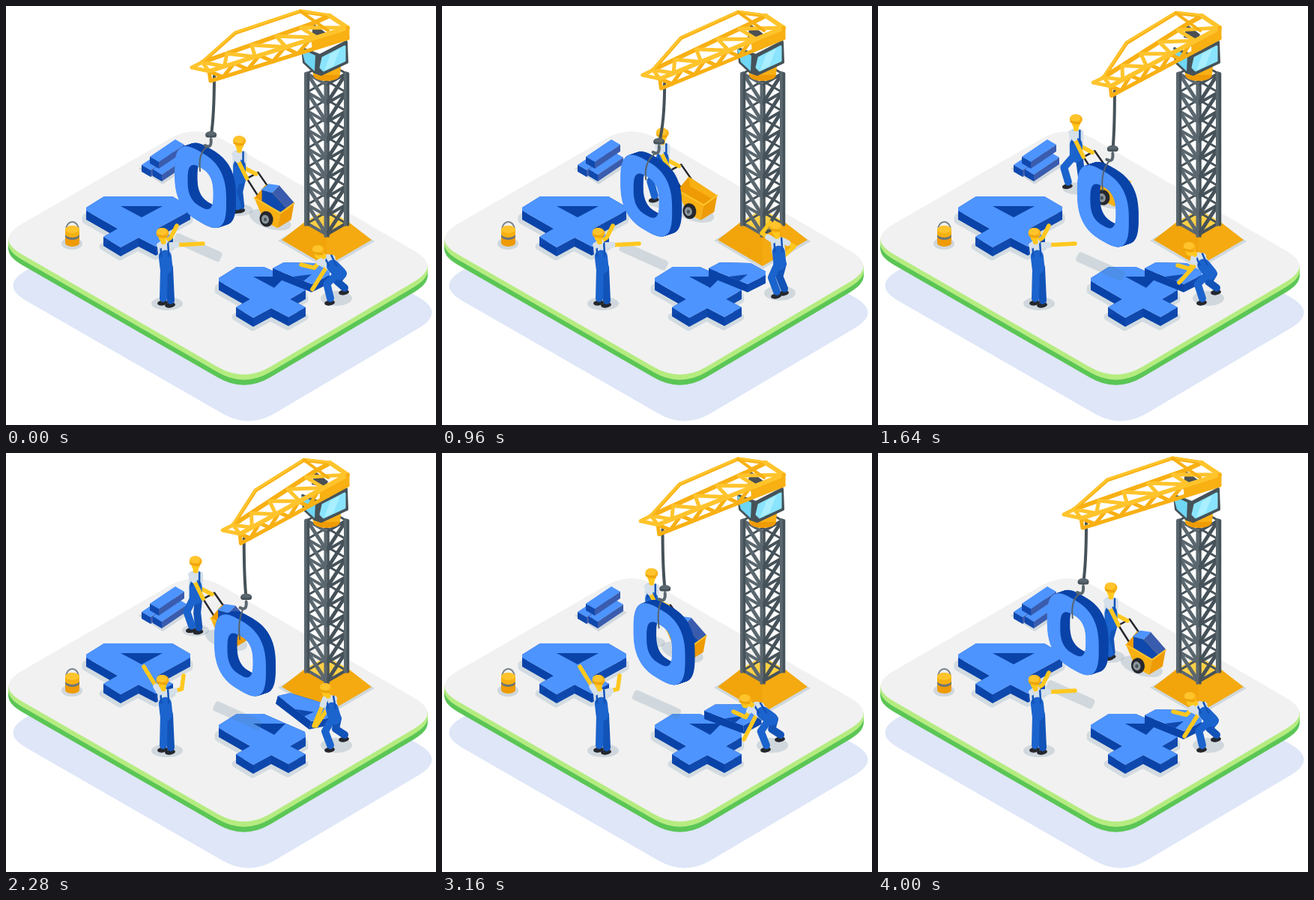
An HTML page with a canvas that plays this animation: 574x559 px, repeating every 4.04 s.

```html
<!DOCTYPE html>
<html lang="en">
<head>
<meta charset="utf-8">
<title>404 construction site</title>
<style>
html, body { margin: 0; width: 100%; height: 100%; overflow: hidden; background: #fff; }
canvas { display: block; width: 574px; height: 559px; }
</style>
</head>
<body>
<canvas id="stage"></canvas>
<script>
const W = 574, H = 559, LOOP = 4040;
const canvas = document.getElementById('stage');
const g = canvas.getContext('2d');
const dpr = window.devicePixelRatio || 1;
canvas.width = W * dpr;
canvas.height = H * dpr;

const BLUE = '#4d94ff', NAVY = '#0a43a8', ROYAL = '#1049ae', SLATE = '#3a5cae';
const SHADE = 'rgba(75,115,140,.2)', STEEL = '#5b676f', IRON = '#465259';
const GOLD = '#ffc42c', AMBER = '#f8b013', ORANGE = '#ee9b05';
const SKIN = '#ffc81f', SHIRT = '#d5e0ea', DENIM = '#1b63cd', DENIM2 = '#1253b8', SHOE = '#25272e';

// ---------- drawing helpers ----------
function trace(p) {
  g.beginPath();
  for (let i = 0; i < p.length; i += 2) g.lineTo(p[i], p[i + 1]);
}
function poly(p, fill) {
  trace(p);
  g.closePath();
  g.fillStyle = fill;
  g.fill();
}
function line(p, color, w) {
  trace(p);
  g.strokeStyle = color;
  g.lineWidth = w;
  g.lineCap = g.lineJoin = 'round';
  g.stroke();
}
function softPoly(p, fill, w) {
  poly(p, fill);
  line([...p, p[0], p[1]], fill, w);
}
function oval(x, y, rx, ry, fill, rot = 0) {
  g.beginPath();
  g.ellipse(x, y, rx, ry, rot, 0, 7);
  g.fillStyle = fill;
  g.fill();
}
function at(x, y, draw, rot = 0) {
  g.save();
  g.translate(x, y);
  g.rotate(rot);
  draw();
  g.restore();
}
// Flat shape with walls going straight down
function prism(p, h, top = BLUE) {
  for (let i = 0; i < p.length; i += 2) {
    const j = (i + 2) % p.length;
    const [x, y, u, v] = [p[i], p[i + 1], p[j], p[j + 1]];
    poly([x, y, u, v, u, v + h, x, y + h], (u - x) * (v - y) > 0 ? NAVY : ROYAL);
  }
  poly(p, top);
}

// ---------- motion helpers ----------
const mix = (a, b, k) => a + (b - a) * k;
const mixAll = (a, b, k) => a.map((v, i) => mix(v, b[i], k));

function keyed(steps, t) {
  let i = 0;
  while (i < steps.length - 2 && t > steps[i + 1][0]) i++;
  const [t0, a] = steps[i], [t1, b] = steps[i + 1];
  const k = Math.min(1, Math.max(0, (t - t0) / (t1 - t0)));
  return mixAll(a, b, k * k * (3 - 2 * k));
}
const swing = (t, mid, amp, lag) => mid - amp * Math.cos((t - lag) / LOOP * 2 * Math.PI);

// ---------- ground ----------
function slab(dx, dy, fill) {
  const c = [[253, 157], [580, 347], [318, 502], [-14, 311]];
  g.beginPath();
  c.forEach((q, i) => {
    const toward = o => mixAll(q, o, 35 / Math.abs(o[0] - q[0]));
    const [ax, ay] = toward(c[(i + 3) % 4]), [bx, by] = toward(c[(i + 1) % 4]);
    g.lineTo(ax + dx, ay + dy);
    g.quadraticCurveTo(q[0] + dx, q[1] + dy, bx + dx, by + dy);
  });
  g.closePath();
  g.fillStyle = fill;
  g.fill();
}
function ground() {
  slab(6, 62, '#dee6f8');
  for (let d = 14; d > 0; d--) slab(0, d, d > 7 ? '#5bc656' : '#b5ec80');
  slab(0, 0, '#f1f1f1');
}

function bucket() {
  oval(88, 317, 14, 8, SHADE);
  g.beginPath();
  g.ellipse(88.5, 299, 8.5, 11, 0, Math.PI, 0);
  g.strokeStyle = '#7b868c';
  g.lineWidth = 2;
  g.stroke();
  for (let y = 316; y >= 298; y--) {
    const band = y > 307 ? ORANGE : y > 304 ? '#69747a' : AMBER;
    oval(88.5, y, 9.5, 5, y === 298 ? GOLD : band);
  }
}

function brick(x, y) {
  at(x, y, () => {
    poly([0, 0, 34, -23, 46, -16, 12, 7], BLUE);
    poly([0, 0, 12, 7, 12, 16, 0, 9], ROYAL);
    poly([12, 7, 46, -16, 46, -7, 12, 16], SLATE);
  });
}
function brickPile() {
  poly([177, 217, 209, 238, 247, 213, 215, 196], SHADE);
  brick(181, 212);
  brick(196, 218);
  brick(192, 201);
}

// ---------- digits ----------
const FOUR = [0, 15, 24, 0, 115, 0, 139, 14, 139, 19, 95, 43, 116, 54, 93, 67,
  70, 55, 46, 68, 23, 54, 42, 43, 0, 19];
const BROKEN = [...FOUR.slice(0, 4), 60, 0, 115, 24, 116, 31, ...FOUR.slice(10)];

function four(x, y, shape, holeRight) {
  at(x, y, () => {
    at(-1, 13, () => softPoly(shape, '#d2dbe0', 9));
    prism(shape, 12);
    poly([46, 13, holeRight, 13, 74, 28], NAVY);
  });
}
function piece(t) {
  const rest = [356, 350, 0];
  const [x, y, r] = keyed([[0, rest], [1700, rest], [2280, [363, 324, .27]],
    [3160, [350, 344, -.03]], [3950, rest]], t);
  at(x, y, () => {
    prism([0, 0, 15, -8, 56, -7, 76, 4, 76, 9, 52, 21], 11);
    poly([27, 11, 52, 8, 41, 17], ROYAL);
  }, r);
}

// Rounded box on the upright plane, which drops by .577 per unit to the right
function roundel(path, rx, ry) {
  const soft = v => Math.sign(v) * Math.abs(v) ** (2 / 2.8);
  for (let i = 0; i < 90; i++) {
    const a = i / 45 * Math.PI, x = rx * soft(Math.cos(a));
    path.lineTo(34.5 + x, 58.5 + .577 * x + ry * soft(Math.sin(a)));
  }
  path.closePath();
}
const ring = new Path2D(), hole = new Path2D();
roundel(ring, 34.5, 47);
roundel(hole, 17, 26);
ring.addPath(hole);

const zeroPlace = t => [swing(t, 250.5, 27.5, 250), swing(t, 197.5, 14.5, 80)];

function zeroShadow(t) {
  const [x, y] = zeroPlace(t);
  at(x + 31, y + 139, () => {
    g.beginPath();
    g.roundRect(-34, -7, 68, 14, 4);
    g.fillStyle = SHADE;
    g.fill();
  }, .42);
}
function zero(t) {
  const [x, y] = zeroPlace(t);
  for (let i = 26; i >= 0; i--) {
    at(x + i / 2, y - i * .17, () => {
      g.fillStyle = i ? NAVY : BLUE;
      g.fill(ring, 'evenodd');
    });
  }
}
function cord(x, y, cx, cy, u, v, color, w) {
  g.beginPath();
  g.moveTo(x, y);
  g.quadraticCurveTo(cx, cy, u, v);
  g.strokeStyle = color;
  g.lineWidth = w;
  g.lineCap = 'round';
  g.stroke();
}
function ropeAndHook(t) {
  const tx = swing(t, 298.7, 20.7, 0), ty = swing(t, 104, 11, 0);
  const hx = swing(t, 297, 24, 150), hy = swing(t, 184.5, 10.5, 40);
  const [zx, zy] = zeroPlace(t);
  cord(tx, ty, tx, mix(ty, hy, .65), hx, hy, IRON, 4);
  cord(hx - 4, hy + 13, zx + 31, zy + 12, zx + 34, zy + 37, '#56636e', 2);
  cord(hx, hy + 4, hx + 1, hy + 17, hx - 8, hy + 12, STEEL, 4);
  line([hx - 4, hy - 2, hx + 4, hy - 2], IRON, 7);
  oval(hx, hy - 4, 6.5, 3, STEEL);
}

// ---------- crane ----------
function tower() {
  poly([363, 313, 398, 292, 458, 292, 492, 314, 428, 351], SHADE);
  poly([368, 312, 399, 288, 428, 305, 428, 347], '#f1a50b');
  poly([488, 312, 457, 288, 428, 305, 428, 347], '#f4aa10');
  poly([399, 288, 428, 271, 457, 288, 428, 305], '#ffd045');
  const step = 25, panels = 8;
  for (let k = 0; k <= panels; k++) {
    const y = 90 + k * step;
    line([402, y, 428, y - 15, 454, y], IRON, 3);
  }
  for (let k = 0; k <= panels; k++) {
    const y = 90 + k * step;
    for (const [x, color] of [[402, STEEL], [454, IRON]]) {
      line([x, y, 428, y + 15], color, 4);
      if (k < panels) line([x, y, 428, y + 15 + step], color, 5);
    }
  }
  for (const [x, y] of [[400, 90], [426.5, 105], [453, 90]]) {
    line([x, y, x, y + 202], STEEL, 4);
    line([x + 3.5, y, x + 3.5, y + 202], IRON, 3.5);
  }
}

function cab() {
  oval(428, 92, 18, 8, ORANGE);
  poly([408, 80, 447, 80, 446, 92, 410, 92], AMBER);
  softPoly([396, 57, 419, 66, 454, 48, 455, 75, 421, 91, 412, 88, 398, 75], IRON, 4);
  poly([394, 57, 413, 66, 412, 87, 399, 75], '#6fd6f4');
  softPoly([423, 69, 452, 54, 452, 73, 424, 86, 420, 82], '#8ae4fd', 3);
  poly([433, 64, 446, 57, 437, 80, 425, 86], '#a9efff');
}

function zigzag(a, b, c, d, n, color, w) {
  const pts = [];
  for (let i = 0; i <= n; i++) pts.push(...(i % 2 ? mixAll(c, d, i / n) : mixAll(a, b, i / n)));
  line(pts, color, w);
}
function boom(t) {
  const k = swing(t, .5, .5, 0);
  // The further from the mast, the more a joint turns
  const joint = (x, y) => {
    const reach = Math.min(1, ((456 - x) / 185) ** 2) * k;
    return [x + 43 * reach, y + 22 * reach];
  };
  const tip = joint(248, 82), low = joint(273, 100), near = joint(271, 87), far = joint(262, 75);
  const bend = joint(306, 36), apex = joint(393, 7), back = joint(410, 23), end = joint(432, 13);
  const top = [456, 29], base = [456, 43];

  poly([...back, 430, 38, 426, 46, 408, 42], '#4b5053');
  line([...far, ...back, ...end], AMBER, 6);
  zigzag(far, back, near, top, 9, GOLD, 5);
  line([...far, ...bend, ...apex, ...end], AMBER, 5);
  at(0, -1, () => line([...far, ...bend, ...apex, ...end], GOLD, 3));
  line([...apex, 430, 33], AMBER, 4);
  line([...end, ...top], GOLD, 6);
  zigzag(near, top, low, base, 11, AMBER, 5);
  poly([...mixAll(near, top, .74), ...top, ...base, ...mixAll(low, base, .74)], AMBER);
  line([...near, ...top], GOLD, 6);
  line([...near, ...low, ...base, ...top], AMBER, 5);
  line([...tip, ...far, ...near, ...tip], GOLD, 5);
}

// ---------- people ----------
// Middle joint of a limb made of two equal bones
function elbow(a, b, bone, side) {
  const dx = b[0] - a[0], dy = b[1] - a[1], d = Math.hypot(dx, dy);
  const h = Math.sqrt(Math.max(0, bone * bone - d * d / 4)) * side / d;
  return [(a[0] + b[0]) / 2 - dy * h, (a[1] + b[1]) / 2 + dx * h];
}
function man(head, hip, feet, hands, armSide) {
  const sh = mixAll(head, hip, .43);
  const limb = (a, b, bone, side, color, w) => {
    const mid = elbow(a, b, bone, side);
    line([...a, ...mid, ...b], color, w);
    return mid;
  };
  const leg = (i, dx, side, color) => {
    const [x, y] = feet[i];
    oval(x - 1, y + 2, 7, 3.5, SHOE, -.15);
    limb([hip[0] + dx, hip[1]], [x, y - 4], 20, side, color, 10);
  };
  const arm = (i, dx) => {
    const from = [sh[0] + dx, sh[1] - 4];
    const mid = limb(from, hands[i], 18, armSide, SKIN, 5.5);
    line([...from, ...mixAll(from, mid, .45)], SHIRT, 8);
  };
  leg(1, 4, .5, DENIM2);
  leg(0, -3, 1, DENIM);
  arm(1, 6);
  line([...sh, ...mixAll(sh, hip, .5)], SHIRT, 18);
  line([...mixAll(sh, hip, .42), ...hip], DENIM, 17);
  for (const dx of [-5, 5]) {
    line([sh[0] + dx, sh[1] - 7, ...mixAll([sh[0] + dx, sh[1]], [hip[0] + dx, hip[1]], .4)], DENIM2, 2.5);
  }
  arm(0, -6);
  const [x, y] = head;
  line([x, y, ...mixAll(head, sh, .55)], SKIN, 7);
  oval(x, y + 4, 5.5, 6.5, SKIN);
  oval(x, y - 1, 8.5, 7, AMBER);
  oval(x - 1, y - 3, 7, 5, GOLD);
  line([x - 7, y + 2, x + 5, y + 4], '#e9a20a', 2);
}

function signaller(t) {
  oval(215, 397, 21, 9, SHADE);
  const [k] = keyed([[1760, [0]], [2240, [1]], [3350, [1]], [3900, [0]]], t);
  man([209, 304], [214, 349], [[210, 394], [220, 397]],
    [mixAll([228, 293], [184, 285], k), mixAll([263, 317], [237, 297], k)], 1);
}

// Each pose: head, hip, both hands, and how upright the stance is
function fitter(t) {
  const push = [417, 327, 446, 357, 394, 345, 409, 378, 0];
  const stand = [446, 296, 451, 344, 438, 289, 457, 333, 1];
  const grab = [416, 323, 444, 357, 400, 346, 402, 369, 0];
  const lift = [427, 315, 439, 354, 411, 364, 414, 364, 0];
  const shove = [405, 330, 440, 355, 389, 345, 403, 382, 0];
  const p = keyed([[120, push], [520, stand], [1060, stand], [1560, grab], [1720, grab],
    [2280, lift], [3160, shove], [3950, push]], t);
  const feet = [mixAll([433, 394], [447, 385], p[8]), mixAll([452, 380], [457, 381], p[8])];
  oval(mix(441, 451, p[8]), mix(390, 383, p[8]), 21, 10, SHADE);
  man(p.slice(0, 2), p.slice(2, 4), feet, [p.slice(4, 6), p.slice(6, 8)], -1);
}

function cart(loaded) {
  oval(354, 286, 29, 12, SHADE, .3);
  line([337, 253, 323, 231, 338, 223, 352, 243], SHOE, 2.5);
  poly([333, 257, 348, 239, 386, 264, 368, 277], ORANGE);
  poly([348, 239, 386, 264, 382, 270, 350, 252], AMBER);
  if (loaded) {
    poly([343, 246, 357, 250, 378, 273, 367, 276, 343, 261], ROYAL);
    poly([357, 250, 366, 240, 386, 263, 378, 273], SLATE);
    poly([342, 246, 352, 238, 366, 240, 357, 250], BLUE);
  }
  poly([333, 257, 368, 277, 364, 297, 346, 288], AMBER);
  poly([368, 277, 386, 264, 382, 286, 364, 297], ORANGE);
  line([333, 257, 368, 277, 386, 264], GOLD, 2);
  oval(349, 285, 9, 10.5, SHOE, -.2);
  oval(347.5, 285.5, 5, 6, '#8b969c', -.2);
  oval(347.5, 285.5, 2, 2.5, IRON);
}
function carrier(t) {
  const u = swing(t, .5, .5, 200);
  const s = Math.sin(u * Math.PI * 4) * 8;
  at(-60 * u, -36.5 * u, () => {
    oval(313, 273, 18, 8, SHADE);
    cart(t < 280 || t > 1960);
    man([313, 182], [313, 230], [[308 + s, 271 + s / 2], [317 - s, 273 - s / 2]],
      [[323, 231], [335, 225]], 1);
  });
}

// ---------- scene ----------
function draw(t) {
  g.setTransform(dpr, 0, 0, dpr, 0, 0);
  g.fillStyle = '#fff';
  g.fillRect(0, 0, W, H);
  ground();
  brickPile();
  bucket();
  four(107, 254, FOUR, 102);
  carrier(t);
  tower();
  four(284, 348, BROKEN, 89);
  zeroShadow(t);
  piece(t);
  zero(t);
  ropeAndHook(t);
  cab();
  boom(t);
  fitter(t);
  signaller(t);
}

const start = performance.now();
function tick() {
  draw((performance.now() - start) % LOOP);
  requestAnimationFrame(tick);
}
tick();
</script>
</body>
</html>
```
